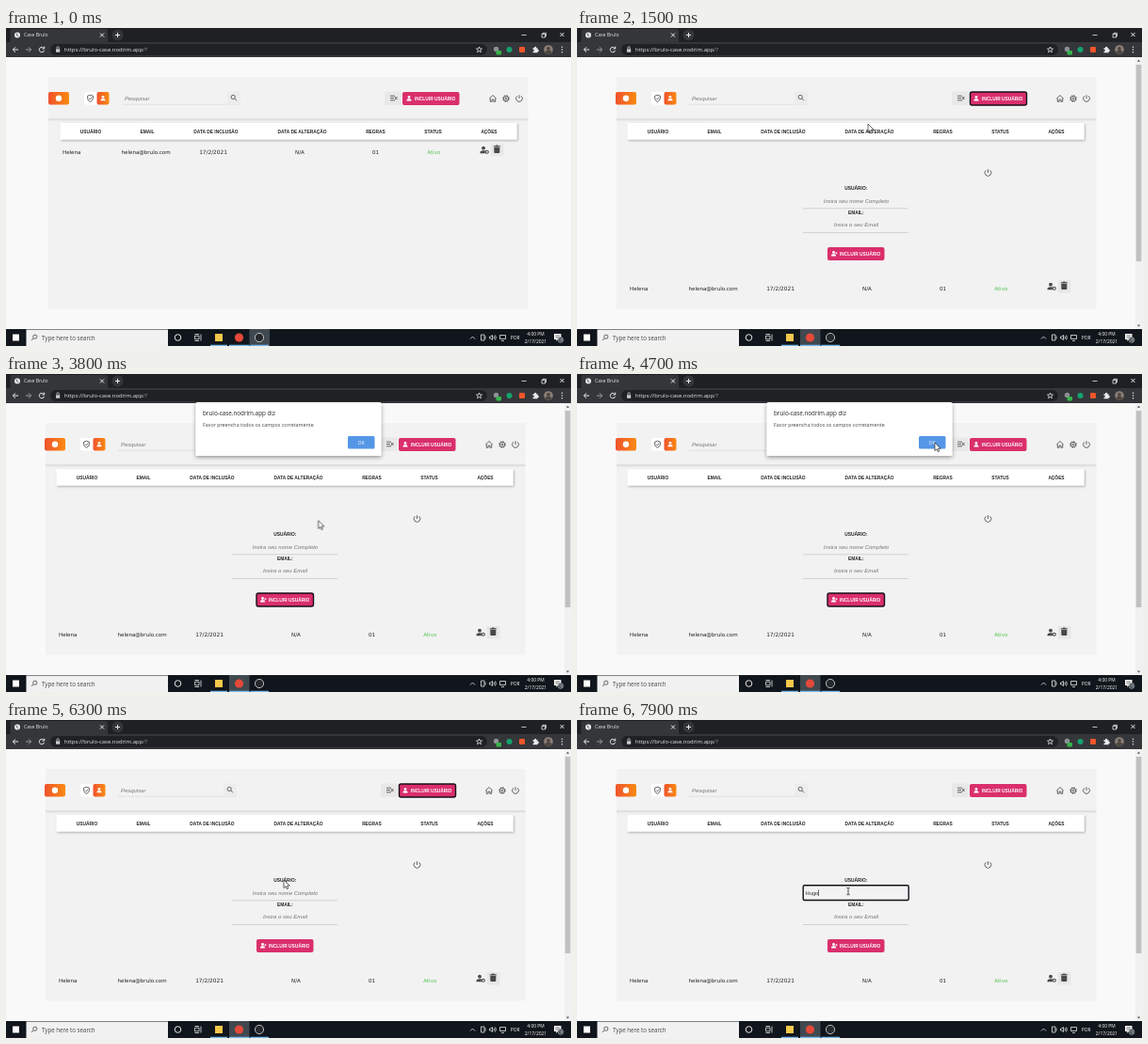
An HTML page that plays this animation: 600 px wide and 338 px high, repeating every 8 s.

```html
<!DOCTYPE html>
<html lang="pt">
<head>
<meta charset="utf-8">
<title>User list</title>
<style>
html, body { margin: 0; width: 100%; height: 100%; overflow: hidden; background: #f9f9f9; }
svg { display: block; }
.ui { font-family: "Open Sans", "Noto Sans", sans-serif; }
.cap { font: bold 4.85px "Liberation Sans", Arial, sans-serif; }
.hint { font: italic 5.95px "Liberation Sans", Arial, sans-serif; fill: #757575; }
.typed { font: 5.8px "Liberation Sans", Arial, sans-serif; fill: #333; }
.cell { font: 5.55px "DejaVu Sans", Verdana, sans-serif; fill: #222; }
.mid { text-anchor: middle; }
.line { fill: none; stroke: #555; stroke-width: .9; }
.light { fill: none; stroke: #e8eaed; stroke-width: 1; }
.ring { fill: none; stroke: #17101a; stroke-width: 1.4; }

.step { animation: 8s step-end infinite; }
.shift { animation-name: shift; }
.row { animation-name: row; }
.form { animation-name: form; }
.alert { animation-name: alert; }
.top-ring { animation-name: topRing; }
.send-ring { animation-name: sendRing; }
.field { animation-name: field; }
.hint1 { animation-name: hint; }
.k1 { animation-name: k1; }
.k2 { animation-name: k2; }
.k3 { animation-name: k3; }
.k4 { animation-name: k4; }
.caret { animation-name: caret; }
.recorder { animation-name: recorder; }
.browser { animation-name: browser; }
.arrow { animation-name: arrow; }
.beam { animation-name: beam; }
.pointer { animation: pointer 8s ease-in-out infinite; }

@keyframes shift { 0%, 62.5% { transform: none; } 13.75%, 72.5%, 100% { transform: translateX(var(--dx)); } }
@keyframes row { 0%, 62.5% { transform: none; } 13.75%, 72.5%, 100% { transform: translateY(145px); } }
@keyframes form { 0%, 62.5% { opacity: 0; } 13.75%, 72.5%, 100% { opacity: 1; } }
@keyframes alert { 0%, 61.25%, 100% { opacity: 0; } 40% { opacity: 1; } }
@keyframes topRing { 0%, 35%, 83.75%, 100% { opacity: 0; } 13.75%, 72.5% { opacity: 1; } }
@keyframes sendRing { 0%, 62.5%, 100% { opacity: 0; } 35% { opacity: 1; } }
@keyframes field { 0% { opacity: 0; } 83.75%, 100% { opacity: 1; } }
@keyframes hint { 0% { opacity: 1; } 90%, 100% { opacity: 0; } }
@keyframes k1 { 0% { opacity: 0; } 90%, 100% { opacity: 1; } }
@keyframes k2 { 0% { opacity: 0; } 92.5%, 100% { opacity: 1; } }
@keyframes k3 { 0% { opacity: 0; } 95%, 100% { opacity: 1; } }
@keyframes k4 { 0% { opacity: 0; } 97.5%, 100% { opacity: 1; } }
@keyframes caret {
  0% { transform: translateX(-14px); }
  90% { transform: translateX(-9.8px); }
  92.5% { transform: translateX(-6.6px); }
  95% { transform: translateX(-3.4px); }
  97.5%, 100% { transform: none; }
}
@keyframes recorder { 0% { opacity: 1; } 12.5%, 100% { opacity: 0; } }
@keyframes browser { 0% { opacity: 0; } 12.5%, 100% { opacity: 1; } }
@keyframes arrow { 0% { opacity: 1; } 81.25%, 100% { opacity: 0; } }
@keyframes beam { 0% { opacity: 0; } 81.25%, 100% { opacity: 1; } }
@keyframes pointer {
  0%, 1.25% { transform: translate(470px, 345px); }
  11.25%, 13.75% { transform: translate(450px, 75px); }
  18.75% { transform: translate(309px, 102px); }
  32.5%, 41.25% { transform: translate(283px, 239px); }
  53.75%, 61.25% { transform: translate(380px, 73px); }
  67.5% { transform: translate(402px, 97px); }
  71.25%, 72.5% { transform: translate(448px, 75px); }
  78.75% { transform: translate(295px, 170px); }
  82.5%, 100% { transform: translate(288px, 182px); }
}
</style>
</head>
<body>
<svg width="600" height="338" viewBox="0 0 600 338">
  <defs>
    <linearGradient id="warm"><stop offset="0" stop-color="#f0532d"/><stop offset="1" stop-color="#f98a12"/></linearGradient>
    <filter id="soft" x="-10%" y="-30%" width="120%" height="170%"><feDropShadow dx="1" dy="1.2" stdDeviation="1" flood-opacity=".3"/></filter>
    <filter id="deep" x="-10%" y="-20%" width="120%" height="150%"><feDropShadow dx="0" dy="1.5" stdDeviation="2" flood-opacity=".4"/></filter>
    <g id="user"><circle cy="-1.3" r="1.4"/><path d="M-2.5 2.6V1.9Q-2.5.5 0 .5T2.5 1.9V2.6Z"/></g>
    <g id="power" class="line"><path d="M0-3.8V0M-2.2-2.7a3.4 3.4 0 1 0 4.4 0"/></g>
    <g id="gear" class="line"><circle r="2.7"/><circle r="1"/><circle r="3.4" stroke-dasharray="1.3 1.37"/></g>
    <g id="zoom"><circle cx="-.8" cy="-.8" r="2.1"/><path d="M.8.8 3 3"/></g>
    <g id="plus"><path d="M-2.5 0h5M0-2.5v5"/></g>
    <g id="cross"><path d="M-2-2 2 2M2-2-2 2"/></g>
  </defs>

  <!-- Page -->
  <rect width="600" height="338" fill="#f9f9f9"/>
  <g class="step shift" style="--dx:-3px">
    <rect x="45" y="52" width="509.5" height="246.5" fill="#f2f2f2"/>
    <path d="M45 97h509.5" stroke="#c9c9c9"/>
    <path d="M45 98h509.5" stroke="#e4e4e4"/>
  </g>
  <g class="step shift" style="--dx:-4px">
    <rect x="45" y="68" width="22" height="13.5" rx="2" fill="url(#warm)"/>
    <circle cx="56" cy="74.8" r="3.2" fill="#fff"/>
    <rect x="83" y="68" width="15" height="13.5" rx="2" fill="#fff"/>
    <rect x="96.5" y="68" width="13" height="13.5" rx="2" fill="url(#warm)"/>
    <path class="line" d="M89.5 71.2l2.9 1v2.5q0 2.4-2.9 3.7-2.9-1.3-2.9-3.7v-2.5zM88.1 74.7l1.1 1.1 2-2.2"/>
    <use href="#user" x="103" y="74.6" fill="#fff"/>
    <path d="M123 81.3h126" stroke="#dfdfdf" stroke-width=".8"/>
    <rect x="235" y="67.5" width="14" height="14" fill="#ececec"/>
    <use href="#zoom" x="242" y="74.2" class="line"/>
    <text class="hint" x="126" y="76.7">Pesquisar</text>
    <rect x="402" y="67.5" width="18" height="14.5" rx="1.5" fill="#e8e8e8"/>
    <path class="line" d="M408 72.2h5M408 74.5h4M408 76.8h5M413 73l2.5 3M415.5 73l-2.5 3"/>
    <rect x="421" y="68" width="60.5" height="14" rx="2" fill="#da2f6b"/>
    <rect class="ring step top-ring" x="421.5" y="68" width="60" height="14" rx="2"/>
    <use href="#user" x="428" y="74.8" fill="#fff"/>
    <text class="cap" x="434" y="76.7" fill="#fff">INCLUIR USUÁRIO</text>
    <path class="line" d="M513.3 75 517 71.5l3.7 3.5M514.3 74.5v3.8h1.8v-2.3h1.8v2.3h1.8v-3.8"/>
    <use href="#gear" x="531" y="75"/>
    <use href="#power" x="545" y="75"/>

    <rect x="57.5" y="101" width="485" height="17.5" fill="#fff" filter="url(#soft)"/>
    <g class="cap mid" fill="#222">
      <text x="90" y="111.5">USUÁRIO</text>
      <text x="150" y="111.5">EMAIL</text>
      <text x="223" y="111.5">DATA DE INCLUSÃO</text>
      <text x="314.5" y="111.5">DATA DE ALTERAÇÃO</text>
      <text x="392.5" y="111.5">REGRAS</text>
      <text x="453.5" y="111.5">STATUS</text>
      <text x="513" y="111.5">AÇÕES</text>
    </g>

    <g class="step row">
      <g class="cell">
        <text x="60" y="133.8">Helena</text>
        <text x="122.5" y="133.8">helena@brulo.com</text>
        <text class="mid" x="220" y="133.8" style="font-size:5.8px">17/2/2021</text>
        <text class="mid" x="312" y="133.8">N/A</text>
        <text class="mid" x="392.5" y="133.8">01</text>
        <text class="mid" x="454.3" y="133.8" fill="#55c455">Ativo</text>
      </g>
      <rect x="514.5" y="123" width="14" height="13.5" rx="1" fill="#e7e7e7"/>
      <g fill="#484848">
        <circle cx="507" cy="127.7" r="1.9"/>
        <path d="M503.5 133.2v-1q0-2 3.5-2h1.8v3zM518.3 126.7h6v5.3q0 1-1 1h-4q-1 0-1-1zM517.8 125.2h2l.6-.8h1.8l.6.8h2v1h-7z"/>
        <circle cx="510.8" cy="131.8" r="1.5" fill="none" stroke="#484848" stroke-width="1.1"/>
      </g>
    </g>
  </g>

  <!-- New user form -->
  <g class="step form">
    <use href="#power" x="436.5" y="154"/>
    <g class="cap mid" fill="#222">
      <text x="296.3" y="172.4">USUÁRIO:</text>
      <text x="296.3" y="197.9">EMAIL:</text>
    </g>
    <path d="M240 191.8h112M240 217.5h112" stroke="#cfcfcf" stroke-width=".9"/>
    <text class="hint mid step hint1" x="296.5" y="185.7">Insira seu nome Completo</text>
    <text class="hint mid" x="296.5" y="211.2">Insira o seu Email</text>
    <g class="step field">
      <rect class="ring" x="240.2" y="175.7" width="112" height="15.8" rx="1.5"/>
      <g class="typed">
        <text class="step k1" x="242.5" y="185.7">H</text>
        <text class="step k2" x="246.7" y="185.7">u</text>
        <text class="step k3" x="249.9" y="185.7">g</text>
        <text class="step k4" x="253.1" y="185.7">o</text>
      </g>
      <path class="step caret" d="M256.6 180.5v6.5" stroke="#222" stroke-width=".7"/>
    </g>
    <rect x="266" y="233" width="60.5" height="14" rx="2" fill="#da2f6b"/>
    <rect class="ring step send-ring" x="266" y="233" width="60.5" height="14" rx="2"/>
    <use href="#user" x="272.5" y="239.8" fill="#fff"/>
    <path d="M274.2 239.2h2.4M275.4 238v2.4" stroke="#fff" stroke-width=".7"/>
    <text class="cap" x="279" y="241.7" fill="#fff">INCLUIR USUÁRIO</text>
    <rect x="593" y="31" width="7" height="289" fill="#f1f1f1"/>
    <rect x="593.7" y="39" width="5.6" height="209" fill="#c1c1c1"/>
    <path d="M594.8 35.7l1.7-2 1.7 2zM594.8 315.5l1.7 2 1.7-2z" fill="#555"/>
  </g>

  <!-- Browser bars -->
  <g class="ui">
    <rect width="600" height="16" fill="#1f2023"/>
    <path d="M2 16q2.5 0 2.5-2.5V3.5Q4.5 1 7 1h98.5q2.5 0 2.5 2.5v10q0 2.5 2.5 2.5z" fill="#35363a"/>
    <rect y="15" width="600" height="16" fill="#35363a"/>
    <circle cx="12" cy="7.5" r="3" fill="#e8eaed"/>
    <path d="M10.5 6l1.5.5-.5 1.5 1.7 1" fill="none" stroke="#555" stroke-width=".8"/>
    <text x="19" y="9.4" font-size="5.1" fill="#e8eaed">Case Brulo</text>
    <g class="light">
      <use href="#cross" x="102" y="7.5"/>
      <circle cx="118.5" cy="7.5" r="6" fill="#35363a" stroke="none"/>
      <use href="#plus" x="118.5" y="7.5"/>
      <path d="M547.5 7.5h5M569 6.5h3.5v3.5H569zM570 6.5v-1.2h3.5v3.5h-1" stroke-width=".8"/>
      <use href="#cross" x="590.5" y="7"/>
      <path d="M13 23H7.5M10 20.3 7.3 23l2.7 2.7"/>
      <path d="M21 23h5.5M24 20.3l2.7 2.7-2.7 2.7" stroke="#9a9ca0"/>
      <path d="M40.3 21.6a2.7 2.7 0 1 0 .3 2.2M40.7 19.7v2.3h-2.3"/>
    </g>
    <rect x="47" y="17" width="464" height="12" rx="6" fill="#202124"/>
    <rect x="53" y="22.3" width="4.2" height="3.5" rx=".4" fill="#c8cace"/>
    <path d="M53.9 22.3V21q0-1.3 1.2-1.3T56.3 21v1.3" fill="none" stroke="#c8cace" stroke-width=".8"/>
    <text x="62" y="25.2" font-size="5.95" fill="#e8eaed">https://brulo-case.nodrim.app<tspan fill="#9aa0a6">/?</tspan></text>
    <path class="light" d="M502.5 20l.8 2 2.2.1-1.7 1.4.6 2.2-1.9-1.2-1.9 1.2.6-2.2-1.7-1.4 2.2-.1z" style="stroke-width:.8"/>
    <circle cx="520.5" cy="22.5" r="2.7" fill="#8d9095"/>
    <rect x="520.5" y="24" width="5.5" height="4.5" rx="1" fill="#35b44a"/>
    <circle cx="534.5" cy="23" r="3" fill="#13a36d"/>
    <rect x="545" y="20" width="6" height="6" rx="1" fill="#f4562b"/>
    <path d="M559.5 21.3h1.6a1.1 1.1 0 1 1 2 0h1.5v1.7a1 1 0 1 1 0 1.9v1.4h-5.1v-1.5a1 1 0 1 0 0-1.9z" fill="#e8eaed"/>
    <circle cx="576" cy="23" r="4.8" fill="#8b8078"/>
    <path d="M572.4 26.1q.4-2.5 3.6-2.5t3.6 2.5q-1.6 1.7-3.6 1.7t-3.6-1.7" fill="#4c443f"/>
    <circle cx="576" cy="21.8" r="1.9" fill="#4c443f"/>
    <g fill="#e8eaed"><circle cx="590.5" cy="20.3" r=".75"/><circle cx="590.5" cy="23" r=".75"/><circle cx="590.5" cy="25.7" r=".75"/></g>
  </g>

  <!-- Alert box -->
  <g class="ui step alert">
    <rect x="201.5" y="30" width="197" height="57" rx="1.5" fill="#fff" filter="url(#deep)"/>
    <text x="209" y="44.2" font-size="6.3" fill="#222">brulo-case.nodrim.app diz</text>
    <text x="209" y="56.4" font-size="5.35" fill="#444">Favor preencha todos os campos corretamente</text>
    <rect x="363" y="66" width="28.5" height="13.5" rx="1.5" fill="#5596e6"/>
    <text class="mid" x="377" y="74.6" font-size="5.2" fill="#fff">OK</text>
  </g>

  <!-- Taskbar -->
  <g class="ui">
    <rect y="320" width="600" height="18" fill="#11161c"/>
    <rect x="7" y="325.5" width="7" height="7" fill="#fff"/>
    <rect x="21.5" y="320.5" width="150.5" height="17.5" fill="#f1f1f1"/>
    <use href="#zoom" class="line" transform="translate(30 329) scale(-1 1)"/>
    <text x="38" y="331.5" font-size="6.2" fill="#444">Type here to search</text>
    <circle class="light" cx="182.5" cy="329" r="3.3"/>
    <path class="light" d="M200.5 327.2h4.5v3.6h-4.5zM200.5 325.5h4.5M200.5 332.5h4.5M207 325.5v7" style="stroke-width:.8"/>
    <rect class="step browser" x="237" y="320" width="21.5" height="18" fill="#414950"/>
    <rect class="step recorder" x="258.5" y="320" width="21.5" height="18" fill="#414950"/>
    <rect x="222" y="325" width="8" height="8" fill="#f5c84b"/>
    <circle cx="247.5" cy="329" r="4.6" fill="#e5493a"/>
    <circle cx="269" cy="329" r="4.6" fill="#25282c" stroke="#c9ccd0" stroke-width=".9"/>
    <path d="M217 337.4h18M237 337.4h21.5M259.5 337.4h19.5" stroke="#76b9ed" stroke-width="1.2"/>
    <g class="light" style="stroke-width:.8">
      <path d="M493 330.5l2.5-2.5 2.5 2.5"/>
      <path d="M504.5 326h3.5v6h-3.5zM509 327.5v3"/>
      <path d="M513.5 328v2h1.2l1.8 1.5v-5l-1.8 1.5zM518 327.5q1 1.5 0 3M519.5 326.5q1.6 2.5 0 5"/>
      <path d="M524.5 326.5h6v4h-6zM526 332.5h3"/>
    </g>
    <g fill="#fff" font-size="4.95">
      <text x="535.8" y="331">POR</text>
      <text class="mid" x="562.5" y="326.8">4:00 PM</text>
      <text class="mid" x="562.5" y="334.5">2/17/2021</text>
    </g>
    <path d="M582 325h7.5v6h-3.5l-1.7 1.9V331H582z" fill="#f2f2f2"/>
    <path d="M583.5 327h4.5M583.5 329h4.5" stroke="#333" stroke-width=".6"/>
    <circle cx="589" cy="331.5" r="2.9" fill="#39424b" stroke="#d5d8da" stroke-width=".5"/>
    <text class="mid" x="589" y="332.8" font-size="3.4" fill="#fff">10</text>
  </g>

  <g class="pointer">
    <path class="step arrow" d="M0 0v8.6l2-1.9 1.3 3 1.4-.6-1.3-2.9h2.8z" fill="#fff" stroke="#222" stroke-width=".7"/>
    <path class="step beam" d="M-1.6-3.6Q0-3.6 0-2.8 0-3.6 1.6-3.6M0-2.8v5.8M-1.6 3.8Q0 3.8 0 3 0 3.8 1.6 3.8" fill="none" stroke="#222" stroke-width=".8"/>
  </g>
</svg>
</body>
</html>
```
